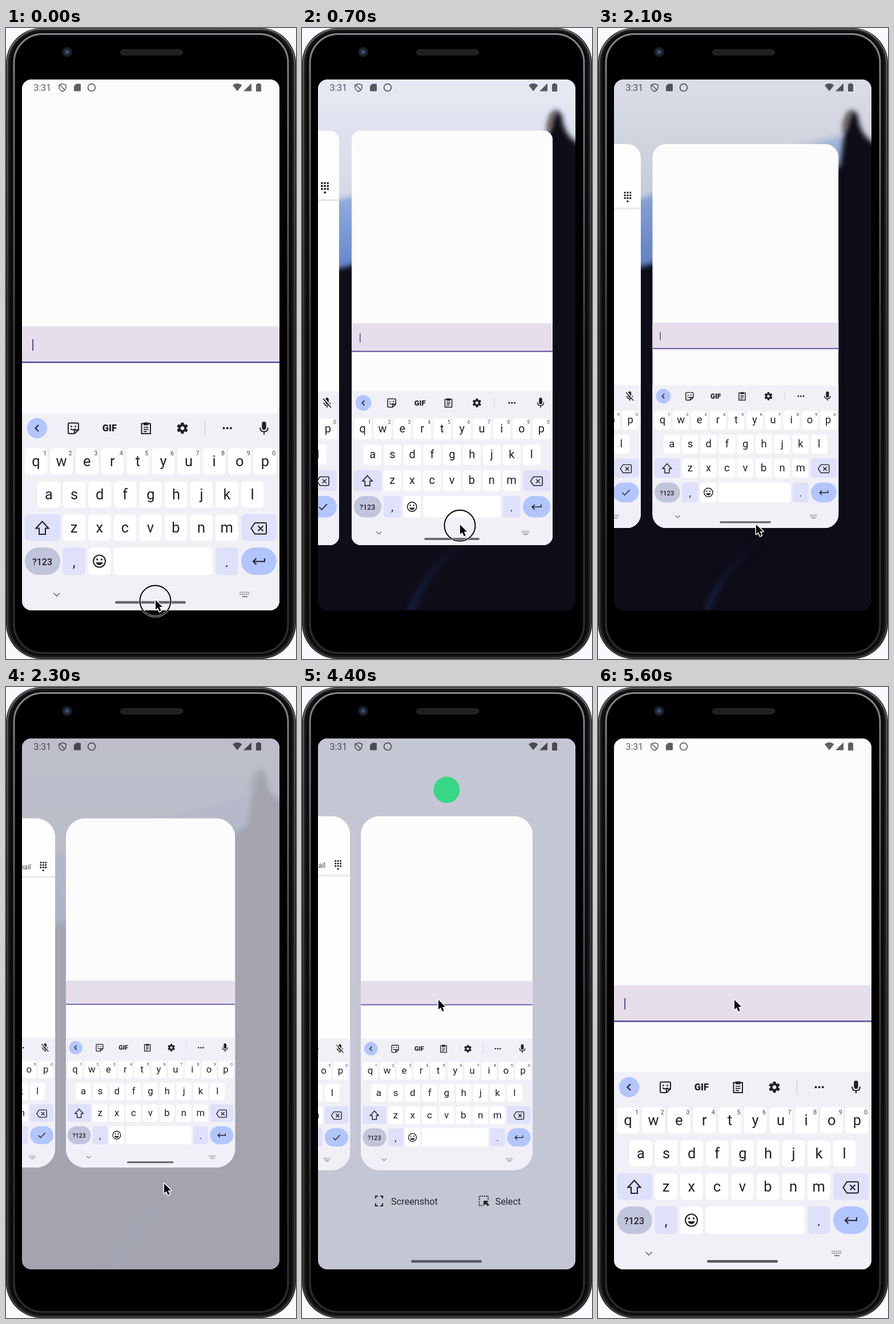
These frames come from a looping animation (508 px wide and 1103 px high, 5.92 s). An HTML page with a canvas:

```html
<!DOCTYPE html>
<html lang="en">
<head>
<meta charset="utf-8">
<title>Recents gesture</title>
<style>
  html, body { margin: 0; width: 100%; height: 100%; overflow: hidden; background: #f8fafd; }
  canvas { display: block; width: 508px; height: 1103px; }
</style>
</head>
<body>
<canvas id="stage" width="508" height="1103"></canvas>
<script>
const W = 508, H = 1103, LOOP = 5920, STEP = 100, LAST = 5600;
const SCREEN = { x: 28, y: 90, w: 451, h: 928, r: 16 };
const HELD = .7805, OVERVIEW = .663;
const RELEASE = 2032, OPEN = 4374, DOCK = 2600;
const SANS = 'Roboto, "Noto Sans", sans-serif';
const INK = '#202025';
const ctx = document.getElementById('stage').getContext('2d');

// Keyframes as flat time, value pairs
const SCRIM = [2100, 0, 2200, .42, 2300, .87, 2400, .97, 2500, 1];
const DIM = [2000, 0, 2100, .06, 2300, .06, 2500, 0];
const ACTIONS = [2300, 0, 2500, 1];

function at(keys, t) {
  if (t <= keys[0]) return keys[1];
  for (let i = 2; i < keys.length; i += 2) {
    if (t <= keys[i]) {
      const k = (t - keys[i - 2]) / (keys[i] - keys[i - 2]);
      return mix(keys[i - 1], keys[i + 1], k);
    }
  }
  return keys[keys.length - 1];
}

const mix = (a, b, k) => a + (b - a) * k;
const span = (t, start, length) => Math.min(1, Math.max(0, (t - start) / length));
const smooth = k => k * k * (3 - 2 * k);

function overshoot(k, tension = 1.2) {
  const u = k - 1;
  return u * u * ((tension + 1) * u + tension) + 1;
}

// cubic-bezier(.3, 0, .1, 1)
function emphasize(k) {
  let lo = 0, hi = 1;
  for (let i = 0; i < 20; i++) {
    const u = (lo + hi) / 2, v = 1 - u;
    if (.9 * v * v * u + .3 * v * u * u + u * u * u < k) lo = u;
    else hi = u;
  }
  return lo * lo * (3 - 2 * lo);
}

function round(x, y, w, h, r) {
  ctx.beginPath();
  ctx.roundRect(x, y, w, h, r);
}

function box(x, y, w, h, r, color) {
  round(x, y, w, h, r);
  ctx.fillStyle = color;
  ctx.fill();
}

function disc(x, y, r, color) {
  ctx.beginPath();
  ctx.arc(x, y, r, 0, Math.PI * 2);
  ctx.fillStyle = color;
  ctx.fill();
}

function ring(x, y, r, color, width) {
  ctx.beginPath();
  ctx.arc(x, y, r, 0, Math.PI * 2);
  ctx.strokeStyle = color;
  ctx.lineWidth = width;
  ctx.stroke();
}

function line(d, width = 2, color = INK) {
  ctx.strokeStyle = color;
  ctx.lineWidth = width;
  ctx.stroke(new Path2D(d));
}

function shape(d, color = INK) {
  ctx.fillStyle = color;
  ctx.fill(new Path2D(d));
}

function text(str, x, y, size, align = 'center', color = INK, weight = 400) {
  ctx.font = `${weight} ${size}px ${SANS}`;
  ctx.textAlign = align;
  ctx.fillStyle = color;
  ctx.fillText(str, x, y);
}

function ramp(c, y0, y1, ...colors) {
  const g = c.createLinearGradient(0, y0, 0, y1);
  colors.forEach((color, i) => g.addColorStop(i / (colors.length - 1), color));
  return g;
}

function makeWallpaper() {
  const cv = document.createElement('canvas');
  cv.width = W;
  cv.height = H;
  const c = cv.getContext('2d');
  c.fillStyle = '#0e0d18';
  c.fillRect(0, 0, W, H);
  c.filter = 'blur(5px)';
  c.fillStyle = ramp(c, 230, 430, '#a9bee8', '#6084ca');
  c.fill(new Path2D('M0 290L90 270L300 210L432 180L424 240L300 330L100 411L0 438Z'));
  c.fillStyle = ramp(c, 90, 290, '#e7eaf5', '#d5d9e6');
  c.fill(new Path2D('M0 60H520V208L482 200Q458 186 455 152L446 143Q436 152 434 174L426 190L300 222L80 296L0 312Z'));
  c.lineWidth = 9;
  c.strokeStyle = '#6d6360';
  c.stroke(new Path2D('M433 178Q434 156 444 148'));
  c.lineWidth = 12;
  c.strokeStyle = ramp(c, 900, 1020, 'rgba(34,40,90,.1)', 'rgba(36,60,140,.4)');
  c.stroke(new Path2D('M190 1020Q215 950 280 900'));
  return cv;
}
const wallpaper = makeWallpaper();

function phone() {
  ctx.fillStyle = '#f8fafd';
  ctx.fillRect(0, 0, W, H);
  box(0, 0, 508, 1103, 62, '#1b1b1d');
  round(2.5, 2, 503, 1099, 60);
  ctx.strokeStyle = ramp(ctx, 0, H, '#6b6d71', '#3c3c3f', '#444447');
  ctx.lineWidth = 2;
  ctx.stroke();
  box(7, 6, 494, 1091, 56, '#0b0b0c');
  round(14, 10.5, 480, 1082, 50);
  ctx.strokeStyle = ramp(ctx, 0, H, '#85888c', '#3b3b3d', '#2c2c2e');
  ctx.lineWidth = 3;
  ctx.stroke();
  box(16, 12.5, 476, 1078, 48, '#000');

  disc(107, 42, 9, '#191b21');
  disc(107, 42, 6, '#242b3b');
  disc(107, 42, 3, '#3b4f77');
  box(200, 37, 110, 11, 5.5, '#242224');
  ctx.setLineDash([1.5, 2]);
  line('M205 40H305M204 42.5H306M205 45H305', 1.2, '#0f0e0f');
  ctx.setLineDash([]);
}

function statusBar() {
  const c = 'rgba(0,0,0,.62)';
  text('3:31', 48.5, 109.7, 16, 'left', c);
  line('M99 97.5L105 99.5V104Q104.5 108.5 99 111Q93.5 108.5 93 104V99.5ZM94.5 99.5L103.5 109', 1.6, c);
  shape('M123 97.5H129.5Q131 97.5 131 99V109Q131 110.5 129.5 110.5H120.5Q119 110.5 119 109V101.5Z', c);
  ring(150, 104, 6.4, c, 1.7);
  shape('M397 100Q405 93.5 413.5 100L405.2 110.5Z', c);
  shape('M416 110.5H430V96.8Z', c);
  shape('M440.5 96.5H444.5V98H447V111H438V98H440.5Z', c);
}

function gear(x, y) {
  ctx.save();
  ctx.translate(x, y);
  disc(0, 0, 7.2, INK);
  for (let i = 0; i < 6; i++) {
    box(-2.6, -9.8, 5.2, 5, 1, INK);
    ctx.rotate(Math.PI / 3);
  }
  disc(0, 0, 3.2, '#f1f0f7');
  ctx.restore();
}

function toolbar(muted) {
  disc(54.5, 699.5, 17.7, '#b2c5ff');
  line('M57 694L51.5 699.5L57 705', 2.1);
  line('M111 690.5H125Q127 690.5 127 692.5V702.5L120 709H111Q109 709 109 707V692.5Q109 690.5 111 690.5ZM127 702.5H122Q120 702.5 120 704.5V709');
  line('M113 700.5Q117.5 704.5 122 700.5', 1.8);
  disc(114.5, 696.5, 1.4, INK);
  disc(121.5, 696.5, 1.4, INK);
  text('GIF', 181.3, 705.3, 16.5, 'center', INK, 900);
  line('M237.5 691.5H253V709H237.5Z');
  shape('M241 689.5H249.5V694.5H241Z');
  line('M241 698H249.5M241 701.7H249.5M241 705.3H247', 1.7);
  gear(309, 699.5);
  line('M348.5 687V712', 1, '#c6c6ce');
  for (const x of [381.5, 387.7, 393.9]) disc(x, 699.5, 2, INK);
  box(448.3, 688, 7.4, 14.5, 3.7, INK);
  line('M445 698.5Q445 705.5 452 705.5Q459 705.5 459 698.5M452 705.5V710.5');
  if (muted) {
    line('M444 689L462 709', 4, '#f1f0f7');
    line('M443 690L461 710');
  }
}

function keyRow(letters, x0, top, digits) {
  [...letters].forEach((ch, i) => {
    const x = x0 + i * 44.58;
    box(x - 19.8, top, 39.6, 46, 6, '#fff');
    text(ch, x, top + 31, 25.5);
    if (digits) text(digits[i], x + 15.5, top + 12.2, 11, 'center', '#45454e');
  });
}

function keyboard(muted, pill) {
  ctx.fillStyle = '#f1f0f7';
  ctx.fillRect(28, 673, 451, 345);
  toolbar(muted);
  keyRow('qwertyuiop', 52.6, 734.5, '1234567890');
  keyRow('asdfghjkl', 75, 792.5);
  keyRow('zxcvbnm', 119.2, 850.5);

  const tint = '#dfe1fb';
  box(33, 850, 62, 46.5, 6, tint);
  line('M63.5 862.5L74.5 874.5H69V885H58V874.5H52.5Z', 2.1);
  box(412, 850, 62, 46.5, 6, tint);
  line('M436 865H454Q456 865 456 867V882.5Q456 884.5 454 884.5H436L429.5 874.8ZM441.5 870.3L450.5 879.3M450.5 870.3L441.5 879.3');

  box(33, 908, 62, 48, 24, '#c0c5dc');
  text('?123', 63.5, 938.5, 16, 'center', INK, 500);
  box(99.4, 908, 39.6, 48, 6, tint);
  text(',', 119.3, 941.5, 25);
  box(143.9, 908, 39.6, 48, 6, '#fff');
  ring(163.6, 932, 10.5, INK, 2.1);
  disc(159.7, 929, 1.7, INK);
  disc(167.5, 929, 1.7, INK);
  shape('M157.5 934Q159 938.8 163.6 938.8Q168.2 938.8 169.7 934Z');
  box(188.5, 908, 173.5, 48, 6, '#fff');
  box(367, 908, 39.6, 48, 6, tint);
  text('.', 386.8, 942, 25);
  box(412, 908, 62, 48, 24, '#b2c5ff');
  line(muted ? 'M434 932.5L440 938.5L452 926' : 'M453 927V932.5H433M438.5 927L433 932.5L438.5 938', 2.1);

  line('M83.5 987.5L89 993L94.5 987.5', 1.6, '#6c6c72');
  ctx.setLineDash([1.9, 1.5]);
  line('M409.5 986.5H427M409.5 990H427', 1.9, '#7c7c82');
  ctx.setLineDash([]);
  line('M413.5 994H423', 1.8, '#7c7c82');
  if (pill) homePill('#66656a');
}

function homePill(color) {
  box(191, 1001.7, 124, 4.6, 2.3, color);
}

function inputApp(caret, pill) {
  box(28, 521.5, 451, 64, [4, 4, 0, 0], '#e6dfeb');
  ctx.fillStyle = '#6250a4';
  ctx.fillRect(28, 583, 451, 2.6);
  if (caret) ctx.fillRect(46, 544, 2.2, 20);
  keyboard(false, pill);
}

function contactApp() {
  text('Type a name, phone number, or email', 414, 226, 18, 'right', '#46464c');
  for (let i = 0; i < 9; i++) disc(440.5 + i % 3 * 6.6, 207.5 + Math.floor(i / 3) * 6.6, 2.4, INK);
  disc(447.1, 228.5, 2.4, INK);
  ctx.fillStyle = ramp(ctx, 244, 250, '#dedee2', '#fefefe');
  ctx.fillRect(28, 244, 451, 6);
  keyboard(true, false);
}

function card(x, y, s, color, content) {
  ctx.save();
  round(x, y, SCREEN.w * s, SCREEN.h * s, SCREEN.r + Math.max(0, HELD - s) * 145);
  ctx.clip();
  ctx.fillStyle = color;
  ctx.fillRect(x, y, SCREEN.w * s, SCREEN.h * s);
  ctx.translate(x, y);
  ctx.scale(s, s);
  ctx.translate(-SCREEN.x, -SCREEN.y);
  content();
  ctx.restore();
}

function actions(alpha, cardTop) {
  if (alpha <= 0) return;
  ctx.globalAlpha = alpha;
  disc(253.3, cardTop - 46, 23, '#35d884');
  line('M133 890H129V894M137 890H141V894M129 902.5V907H133M141 902.5V907H137', 2.1);
  text('Screenshot', 156, 904.5, 16.3, 'left');
  ctx.setLineDash([2, 1.8]);
  line('M326 896V890H310.5V906.5H317', 2);
  ctx.setLineDash([]);
  shape('M318 898H327L324 901L328 905L325.5 907.5L321.5 903.5L318 907Z');
  text('Select', 338.5, 904.5, 16.3, 'left');
  ctx.globalAlpha = 1;
}

function pointer(x, y, pressed) {
  if (pressed) {
    ring(x - .5, y + 1.5, 27, '#fff', 3.4);
    ring(x - .5, y + 1.5, 27, '#000', 2);
  }
  const d = `M${x} ${y}v16.8l3.9-3.6l2.9 6.9l2.9-1.3l-2.9-6.7h5.3z`;
  ctx.lineJoin = 'round';
  line(d, 3, '#fff');
  ctx.lineJoin = 'miter';
  shape(d, '#000');
}

function cover(color, alpha) {
  ctx.globalAlpha = alpha;
  ctx.fillStyle = color;
  ctx.fillRect(SCREEN.x, SCREEN.y, SCREEN.w, SCREEN.h);
  ctx.globalAlpha = 1;
}

function draw(t) {
  const drag = smooth(span(t, 0, 720));
  const settle = overshoot(span(t, RELEASE, 488));
  const open = emphasize(span(t, OPEN, 500));
  const travel = smooth(span(t, 3200, 300));

  const s = mix(mix(mix(1, HELD, drag), OVERVIEW, settle), 1, open);
  const x = 253.5 + 9.5 * drag * (1 - settle) - SCREEN.w * s / 2;
  const y = 554 - 56.4 * (1 - s) - SCREEN.h * s / 2;
  const caret = Math.floor((t - 123) / 497) % 2 !== 0;
  const docked = t >= DOCK;

  phone();
  ctx.save();
  round(SCREEN.x, SCREEN.y, SCREEN.w, SCREEN.h, SCREEN.r);
  ctx.clip();
  ctx.drawImage(wallpaper, 0, 0);
  cover('#c5c6d4', at(SCRIM, t));
  cover('#000', at(DIM, t));
  actions(at(ACTIONS, t) * (1 - Math.min(1, open * 2)), y);
  card(x - 479 * s, y, s, '#fefefe', contactApp);
  card(x, y, s, '#fcfcfc', () => inputApp(caret, !docked));
  if (docked) homePill(s < 1 ? '#56565d' : '#66656a');
  statusBar();
  ctx.restore();
  pointer(mix(262 + 15 * drag, 239, travel), mix(1000 - 132 * drag, 547, travel), t < RELEASE);
}

// The picture advances in steps and holds its last pose
function tick() {
  const t = performance.now() % LOOP;
  draw(Math.min(Math.floor(t / STEP) * STEP, LAST));
  requestAnimationFrame(tick);
}
tick();
</script>
</body>
</html>
```
